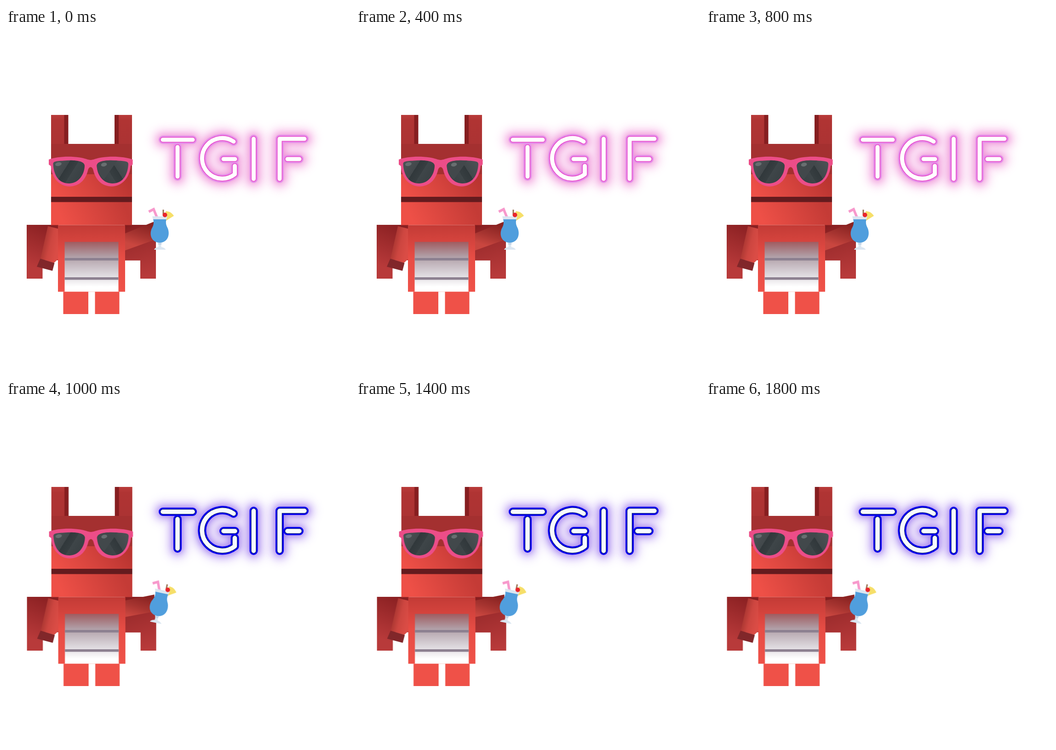
An HTML page for the animation above (2 s loop, 748 by 748 pixels).

```html
<!DOCTYPE html>
<html lang="en">
<head>
<meta charset="utf-8">
<title>TGIF</title>
<style>
  html, body { margin: 0; width: 100%; height: 100%; overflow: hidden; background: #fff; }
  svg { display: block; width: 100vw; height: 100vh; }

  /* Two poses swap every 200 ms */
  .pose-a { animation: first 400ms step-end infinite; }
  .pose-b { animation: second 400ms step-end infinite; }
  .hero { animation: nudge 400ms step-end infinite; }
  .drink { transform-origin: 334px 447px; animation: tilt 400ms step-end infinite; }
  @keyframes first { 0% { visibility: visible } 50%, 100% { visibility: hidden } }
  @keyframes second { 0% { visibility: hidden } 50%, 100% { visibility: visible } }
  @keyframes nudge { 0% { transform: none } 50%, 100% { transform: translateX(.6px) } }
  @keyframes tilt { 0% { transform: none } 50%, 100% { transform: translate(-2px, 3px) rotate(12deg) } }

  .neon { fill: none; stroke-linecap: round; stroke-linejoin: round; }
</style>
</head>
<body>
<svg viewBox="0 0 748 748" role="img" aria-label="TGIF">
  <defs>
    <linearGradient id="ear" x2="0" y2="1">
      <stop stop-color="#b93b3a"/><stop offset=".2" stop-color="#b03433"/><stop offset="1" stop-color="#ac3333"/>
    </linearGradient>
    <linearGradient id="snout" gradientUnits="userSpaceOnUse" x1="125" y1="385" x2="245" y2="300">
      <stop stop-color="#ee5047"/><stop offset=".5" stop-color="#d5433d"/><stop offset="1" stop-color="#b93430"/>
    </linearGradient>
    <linearGradient id="chin" gradientUnits="userSpaceOnUse" x1="125" y1="425" x2="250" y2="370">
      <stop stop-color="#ee5047"/><stop offset="1" stop-color="#c43b36"/>
    </linearGradient>
    <linearGradient id="wingL" gradientUnits="userSpaceOnUse" x1="95" y1="430" x2="58" y2="520">
      <stop stop-color="#8a2022"/><stop offset="1" stop-color="#b83a3a"/>
    </linearGradient>
    <linearGradient id="wingR" gradientUnits="userSpaceOnUse" x1="270" y1="428" x2="305" y2="540">
      <stop stop-color="#861d1f"/><stop offset=".3" stop-color="#9d2c2d"/><stop offset="1" stop-color="#b83a3a"/>
    </linearGradient>
    <linearGradient id="armL" gradientUnits="userSpaceOnUse" x1="80" y1="468" x2="112" y2="476">
      <stop stop-color="#a93631"/><stop offset=".5" stop-color="#cd4640"/><stop offset="1" stop-color="#da4c45"/>
    </linearGradient>
    <linearGradient id="armR" gradientUnits="userSpaceOnUse" x1="285" y1="474" x2="300" y2="426">
      <stop stop-color="#c9463f"/><stop offset=".45" stop-color="#a83531"/><stop offset="1" stop-color="#8a2322"/>
    </linearGradient>
    <linearGradient id="body" x2="0" y2="1">
      <stop stop-color="#c33b36"/><stop offset=".5" stop-color="#e84d45"/><stop offset="1" stop-color="#ef5148"/>
    </linearGradient>
    <linearGradient id="belly" x2="0" y2="1">
      <stop stop-color="#a05c60"/><stop offset=".3" stop-color="#b1a0a8"/>
      <stop offset=".65" stop-color="#dcd7dc"/><stop offset=".9" stop-color="#fff"/>
    </linearGradient>
    <linearGradient id="lens" gradientUnits="userSpaceOnUse" x1="110" y1="292" x2="164" y2="326">
      <stop stop-color="#4a5053"/><stop offset=".36" stop-color="#42484b"/>
      <stop offset=".36" stop-color="#31383b"/><stop offset=".62" stop-color="#373e41"/>
      <stop offset=".62" stop-color="#3f4649"/><stop offset="1" stop-color="#394043"/>
    </linearGradient>
    <filter id="soft" filterUnits="userSpaceOnUse" x="270" y="150" width="460" height="260"><feGaussianBlur stdDeviation="9"/></filter>
    <filter id="tight" filterUnits="userSpaceOnUse" x="270" y="150" width="460" height="260"><feGaussianBlur stdDeviation="8"/></filter>
    <path id="tgif" d="M341 243H406M373 259V323 M495 247A44 44 0 1 0 497.5 318V300M473 285H498
      M538.5 241V328 M595 328V241H649M612 285H638"/>
    <path id="lensShape" d="M102.500 296C102.500 290 108 289.500 125 288.500C150 286.500 170 289 171 299C171 316 160 337 138 338C116 338.500 104 322 102.500 296Z"/>
  </defs>
  <rect width="748" height="748" fill="#fff"/>

  <g class="neon pose-a">
    <use href="#tgif" stroke="#f6a6e2" stroke-width="52" opacity=".3" filter="url(#soft)"/>
    <use href="#tgif" stroke="#e763c4" stroke-width="25" opacity=".6" filter="url(#tight)"/>
    <use href="#tgif" stroke="#e591ea" stroke-width="18"/>
    <use href="#tgif" stroke="#e84fcc" stroke-width="12.500"/>
    <use href="#tgif" stroke="#fff" stroke-width="9"/>
  </g>
  <g class="neon pose-b">
    <use href="#tgif" stroke="#c4a8f5" stroke-width="52" opacity=".3" filter="url(#soft)"/>
    <use href="#tgif" stroke="#6f3be6" stroke-width="25" opacity=".6" filter="url(#tight)"/>
    <use href="#tgif" stroke="#0500ee" stroke-width="18"/>
    <use href="#tgif" stroke="#0c2460" stroke-width="11.500"/>
    <use href="#tgif" stroke="#f7fbff" stroke-width="9.500"/>
  </g>

  <g class="hero">
    <path fill="url(#wingL)" d="M45 428H114V505H79.500V545H45Z"/>
    <path fill="url(#wingR)" d="M258 428H326V545H292V505.500H258Z"/>
    <path fill="url(#armL)" d="M91 431L116 437V500L104 511L75 502Z"/>
    <path fill="#81272a" d="M74.500 501.500L105.500 511L101 528L67 519Z"/>
    <path class="pose-a" fill="url(#armR)" d="M258 447L322 421V461L258 484Z"/>
    <path class="pose-b" fill="url(#armR)" d="M258 436L322 423V460L258 472Z"/>

    <path fill="url(#ear)" d="M98 189H128V253H98ZM244 189H274V253H244Z"/>
    <path fill="#861e20" d="M126.500 189H135.500V253H126.500ZM236 189H245V253H236Z"/>
    <path fill="#a43030" d="M98 252H274V320H98Z"/>
    <path fill="url(#snout)" d="M98 318H274V368H98Z"/>
    <path fill="url(#chin)" d="M98 377H274V428.500H98Z"/>
    <path fill="#641b1e" d="M98 367H274V378.500H98Z"/>

    <path fill="url(#body)" d="M113 428.500H259V573.500H113Z"/>
    <path fill="url(#belly)" d="M127.500 465H244.500V573.500H127.500Z"/>
    <path fill="#8c8090" d="M127.500 500H244.500V505.500H127.500ZM127.500 542H244.500V547.500H127.500Z"/>
    <path fill="#ef5148" d="M124.500 573.500H179V622H124.500ZM193.500 573.500H246.500V622H193.500Z"/>

    <path fill="#ec4d88" d="M93 286C110 280 135 278 160 281.500C172 283 178 287 184 287C190 287 196 283 208 281.500
      C233 278 258 280 275.500 286V297L271 300C269 326 252 344 230 344.500C208 344 195 330 190 310
      C188 300 180 300 178 310C173 330 160 344 138 344.500C116 344 99 326 97.500 300L93 297Z"/>
    <use href="#lensShape" fill="url(#lens)"/>
    <use href="#lensShape" fill="url(#lens)" transform="translate(368.500) scale(-1 1)"/>
    <path fill="#42484b" d="M197.500 299C198 289 219 287 242 288.500L213 329C203 321 197.500 309 197.500 299Z"/>
    <g fill="#686e70">
      <ellipse cx="114" cy="296" rx="7" ry="4" transform="rotate(-12 114 296)"/>
      <ellipse cx="213" cy="297" rx="6.500" ry="4" transform="rotate(-12 213 297)"/>
    </g>
  </g>

  <g class="drink">
    <path fill="#f6df69" d="M347 398.500C355 398 361 402 365 408.500L348 419Z"/>
    <path fill="none" stroke="#f799cc" stroke-width="5.500" d="M310.500 399.500L321 394L330 416"/>
    <path fill="#dbe6f1" d="M318 409.500H350.500L349 417H320Z"/>
    <path fill="#9b7252" d="M340.500 395H343.500V405H340.500Z"/>
    <circle cx="345.500" cy="406.500" r="5" fill="#e8262c"/>
    <path fill="#dbe6f1" d="M329.500 465H339.500L337.500 471V476C342 477 346 479 347.500 482H322C323 479 327 477 331.500 476V471Z"/>
    <path fill="#c2d3e6" d="M331 468H338V471H331Z"/>
    <path fill="#509edd" d="M320 416H348.500C347 424 348 428 351 434C357 446 354 466 334.500 467C314 466 311 446 318 434C321 428 322 424 320 416Z"/>
  </g>
</svg>
</body>
</html>
```
